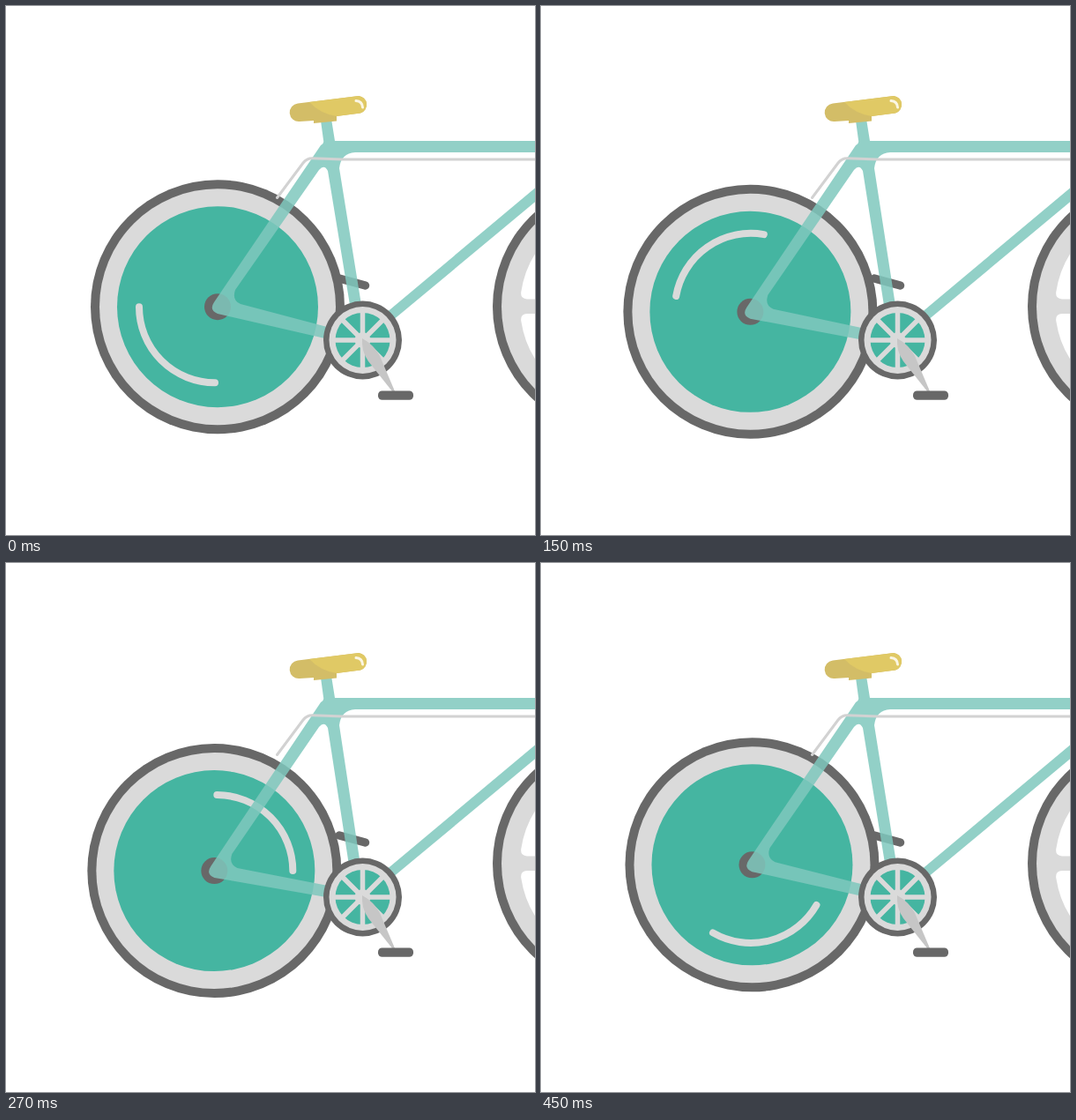
Animation, 600 px wide and 600 px high, one loop 0.48 s. Source, as an HTML page:

```html
<!DOCTYPE html>
<html lang="en">
<head>
<meta charset="utf-8">
<title>Bicycle</title>
<style>
  html, body { margin: 0; height: 100%; overflow: hidden; background: #fff; }
  svg { display: block; width: 100%; height: 100%; }
  .dark { fill: #686868; }
  .light { fill: #dadada; }
  .teal { fill: #45b5a1; }
  .line { fill: none; stroke: #dadada; stroke-linecap: round; }
</style>
</head>
<body>
<svg viewBox="0 0 600 600">
  <!-- front wheel -->
  <circle class="dark" cx="696" cy="341" r="144"/>
  <circle class="light" cx="696" cy="341" r="134"/>
  <path id="gap" fill="#fff" d="M620 332.5H591Q583 332 584.3 324A113 113 0 0 1 620 257.5Z"/>
  <use href="#gap" transform="matrix(1 0 0 -1 0 681.5)"/>

  <!-- far pedal -->
  <path d="M378 309L407.500 317" stroke="#686868" stroke-width="9.500" stroke-linecap="round"/>

  <g id="wheel">
    <circle class="dark" r="144"/>
    <circle class="light" r="134"/>
    <circle class="teal" r="114"/>
    <path id="shine" class="line" stroke-width="8" d="M-89 0A86 86 0 0 0 -3 86"/>
    <circle class="dark" r="15"/>
  </g>

  <path id="frame" fill="#7fc8be" opacity=".85"/>
  <path class="line" style="stroke:#d2d2d2" stroke-width="3" d="M307.500 217.500L337 178Q341 172.500 348 172.700L382 174H610"/>

  <!-- saddle -->
  <path fill="#d3bd67" d="M331 110.500L400 102A10 10 0 0 1 402 121.500L375 125V130.500L349 133V130L333 131A10.200 10.200 0 0 1 331 110.500Z"/>
  <path fill="#e0c965" d="M344 109L400 102A10 10 0 0 1 402 121.500L375 125Q356 122 344 109Z"/>
  <path class="line" style="stroke:#fbf6e3" stroke-width="3" d="M397 107.500Q404 108 404.500 115"/>

  <!-- chainring -->
  <g transform="translate(404.500 379)">
    <circle class="dark" r="44.500"/>
    <circle class="light" r="38"/>
    <circle class="teal" r="31"/>
    <path class="line" stroke-width="5.500" d="M-31 0H31M0-31V31M-22-22L22 22M22-22L-22 22"/>
    <circle class="light" r="9"/>
  </g>
  <path fill="#c6c6c6" d="M404 377Q417 384 424 397L441 437H438L411 403Q403 392 404 377Z"/>
  <rect class="dark" x="422" y="436.500" width="40" height="10.200" rx="4.500"/>
</svg>
<script>
const LOOP = 480, STEP = 30;
const [wheel, shine, frame] = ["wheel", "shine", "frame"].map(id => document.getElementById(id));

// The rear corner follows the hub; the joints near the chainring give a little.
function framePath(dx, dy) {
  const hub = (x, y) => `${x + dx} ${y + dy}`;
  const joint = (x, y) => `${x + dx * .4} ${y + dy * .15}`;
  return `M357 130L369 128L373 153H610V166H396Q380 167 378 184
    L${joint(404, 345)}L${joint(391, 345)}L365 187Q361 179 355 186
    L${hub(260, 322)}Q${hub(256, 334)} ${hub(266, 338)}
    L${joint(368, 365)}L${joint(366, 378)}
    L${hub(240, 349)}Q${hub(230, 345)} ${hub(236, 336)}
    L357 158Q361 156 360 152Z
    M430 349L610 198V214L438 357Z`;
}

function draw(now) {
  const t = Math.floor(now % LOOP / STEP) * STEP;
  const sag = 1 - Math.abs(2 * t / LOOP - 1);
  const dx = -4.2 * sag, dy = 9 * sag;
  wheel.setAttribute("transform", `translate(${240 + dx} ${341.2 + dy})`);
  shine.setAttribute("transform", `rotate(${t * 2 / 3})`);
  frame.setAttribute("d", framePath(dx, dy));
}

const start = performance.now();
function tick() {
  draw(performance.now() - start);
  requestAnimationFrame(tick);
}
tick();
</script>
</body>
</html>
```
